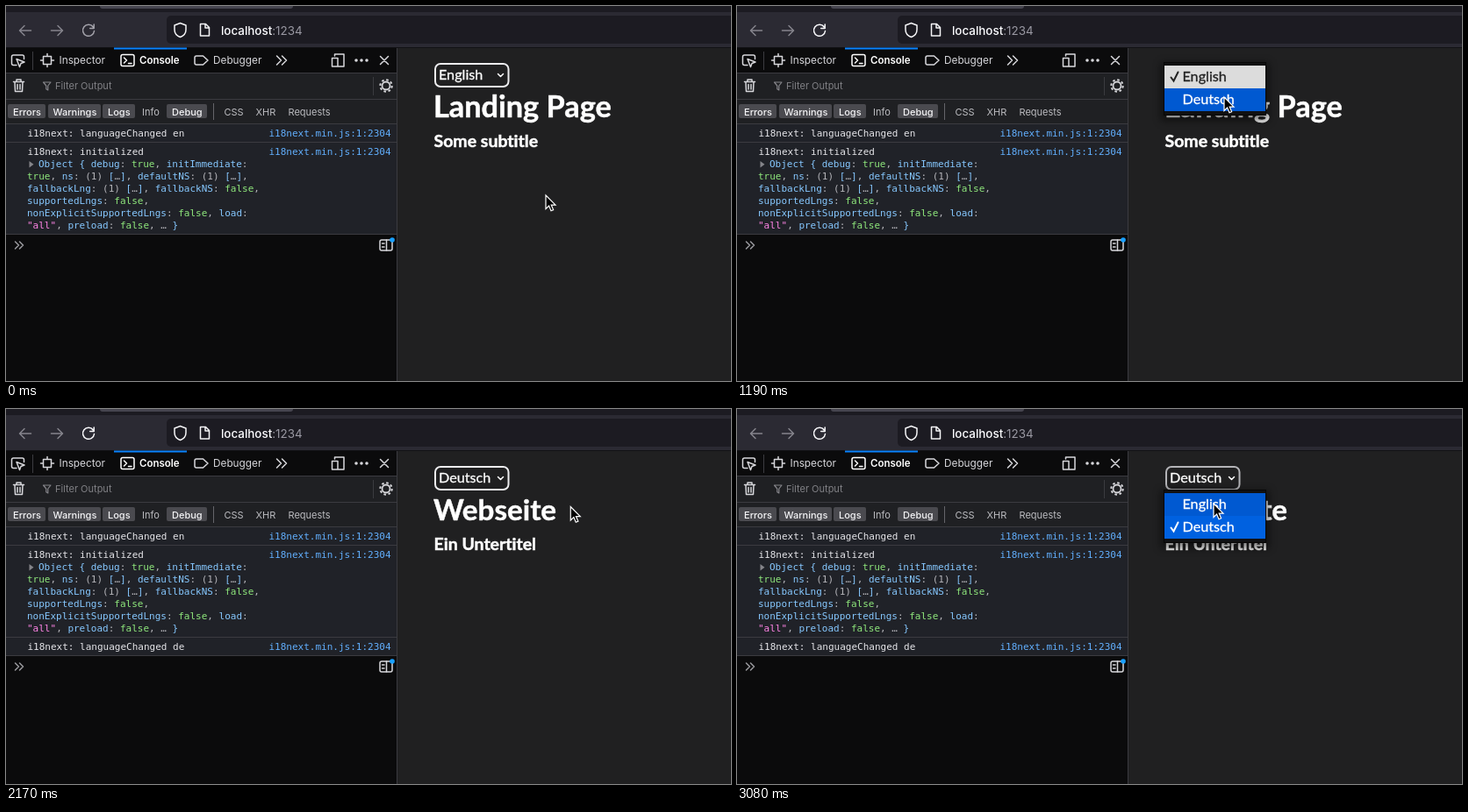
An HTML page for the animation above (3.15 s loop, 826 by 428 pixels).

```html
<!DOCTYPE html>
<html lang="en">
<head>
<meta charset="utf-8">
<title>Language switch</title>
<style>
  html, body { margin: 0; width: 100%; height: 100%; overflow: hidden; background: #202021; }
  svg { display: block; width: 826px; height: 428px; }
  text { white-space: pre; font-variant-ligatures: none; }
  .ui { font-family: Inter, Roboto, sans-serif; font-size: 11px; fill: #bcbcc0; }
  .tab { font-size: 11.8px; fill: #d7d7db; }
  .mono { font-family: "DejaVu Sans Mono", monospace; font-size: 11px; fill: #e6e6ea; }
  .page { font-family: Lato, "Open Sans", sans-serif; font-size: 16.2px; fill: #fff; stroke: #fff; stroke-width: .3; }
  .bold { font-weight: 700; stroke-width: .5; }
  .key { fill: #86c8ff; }
  .link { fill: #62b0ff; }
  .bool { fill: #8fe87c; }
  .str { fill: #ff84e6; }
  .dim { fill: #b4b4b9; }
  .line { fill: none; stroke: #d7d7db; stroke-width: 1.5; stroke-linecap: round; stroke-linejoin: round; }
  .rule { fill: none; stroke: #3b3b40; }
</style>
</head>
<body>
<svg viewBox="0 0 826 428">
  <defs>
    <filter id="blur" x="-30%" y="-30%" width="160%" height="160%"><feGaussianBlur stdDeviation="5"/></filter>
  </defs>

  <!-- browser bar -->
  <rect width="826" height="48" fill="#2b2a33"/>
  <rect width="826" height="7" fill="#1c1b22"/>
  <rect x="107" y="-4" width="220" height="7" rx="3" fill="#46454f"/>
  <rect x="183" y="11" width="660" height="32" rx="5" fill="#1c1b22"/>
  <g class="line">
    <path d="M28.5 28H16m5-5.5L15.5 28l5.5 5.5M51.5 28H64m-5-5.5l5.5 5.5-5.5 5.5" stroke="#85848c"/>
    <path id="reload" d="M99.3 24A6.5 6.5 0 1 0 100.5 28.5M100.2 21v4.5h-4.5"/>
    <path d="M198.500 19.500l6.500 2.500v5q0 6-6.500 8.500-6.500-2.500-6.500-8.500v-5zM221.500 20.500h6l4 4v9.500h-10zM227 21v4h4.500" stroke="#f4f4f6"/>
  </g>
  <text class="ui" x="245" y="32.5" style="font-size:13.4px"><tspan fill="#fbfbfe" font-weight="500">localhost</tspan><tspan fill="#9a99a3">:1234</tspan></text>

  <!-- developer tools -->
  <rect y="48" width="446" height="380" fill="#0b0b0c"/>
  <rect y="77" width="446" height="57" fill="#1f2023"/>
  <rect id="log" y="134" width="446" height="127" fill="#202228"/>
  <path d="M0 47.5H826" stroke="#111114"/>
  <path class="rule" d="M0 76.5H445M0 106.5H445M0 134.5H445M0 155.5H445M0 260.5H445M445.5 48V428M30.5 52V73M418.5 81V102"/>
  <path d="M236.5 111V130" stroke="#65656a"/>
  <path d="M123 48.5H206" stroke="#0a84ff" stroke-width="2"/>

  <g class="line">
    <path d="M12 67.5H8.5q-2 0-2-2V58q0-2 2-2h10q2 0 2 2v2.5M12 60.5l9 3.5-4 1.5-1.5 4z"/>
    <path d="M42.5 57.5h9v9h-9zM47 54.5v3m0 9v3M39.5 62h3m9 0h3"/>
    <rect x="131" y="55.5" width="15" height="13" rx="2" stroke="#fff"/>
    <path d="M134.5 59l3 3-3 3M139.5 65.5h3.5" stroke="#fff"/>
    <path d="M217 57h7.5l5.5 5-5.5 5H217q-2 0-2-2v-6q0-2 2-2z"/>
    <path d="M308.5 57l5 5-5 5m6-10l5 5-5 5"/>
    <path d="M374.5 57v-2h10.5v14h-6M371.5 59.5h6.5v9.5h-6.5zM426.5 57.5l9 9m0-9l-9 9"/>
    <path d="M8.5 86.5h12M12 86v-2h5v2M10 87l.5 10.5h8L19 87M13 89.5v5.5m3-5.5v5.5"/>
    <path d="M42.5 87h8.5l-3.2 4v5l-2-1.2V91z" stroke="#85858a" stroke-width="1.2"/>
    <circle cx="433" cy="91" r="4.5" stroke-width="1.8"/>
    <circle cx="433" cy="91" r="6.7" stroke-width="2" stroke-linecap="butt" stroke-dasharray="2.6 2.662"/>
  </g>
  <path d="M399 62h0m6 0h0m6 0h0" stroke="#d7d7db" stroke-width="3.6" stroke-linecap="round"/>

  <g class="ui tab">
    <text x="60.5" y="66.3">Inspector</text>
    <text x="152" y="66.3" font-weight="600" fill="#fff" style="font-size:11.5px">Console</text>
    <text x="236" y="66.3">Debugger</text>
  </g>
  <text class="ui" x="56" y="95" style="fill:#808085">Filter Output</text>
  <g id="filters" class="ui"></g>

  <g id="messages" class="mono"></g>
  <path d="M26.5 177l5 3.7-5 3.7z" fill="#85858a"/>
  <g id="changed">
    <path class="rule" d="M0 281.5H445"/>
  </g>

  <g id="prompt">
    <path class="line" d="M10.5 269l4 4-4 4m5-8l4 4-4 4" stroke-width="1.3" style="stroke:#9a9a9f"/>
    <rect class="line" x="426" y="267" width="14" height="12" rx="2"/>
    <path class="line" d="M433.5 267v12M428.5 271h2.500m-2.500 4h2.500"/>
    <circle cx="440" cy="267" r="2.8" fill="#18a0ff"/>
  </g>

  <!-- web page -->
  <rect x="446" y="48" width="380" height="380" fill="#202021"/>
  <text id="title" class="page bold" x="487" y="127"></text>
  <text id="subtitle" class="page bold" x="487.5" y="160.5" style="font-size:19.5px"></text>
  <rect id="select" x="489" y="66" width="83.5" height="26" rx="6" fill="#202021" stroke-width="2"/>
  <text id="value" class="page" x="493" y="84"></text>
  <path class="line" d="M560.5 77.5l3 3 3-3" style="stroke:#fff"/>

  <g id="popup">
    <rect x="483" y="1" width="123" height="66" fill="#000" opacity=".5" filter="url(#blur)"/>
    <rect x="486.5" y=".5" width="116" height="60" fill="#111112" stroke="#070707"/>
    <rect id="row0" x="487" y="4" width="115" height="26"/>
    <rect id="row1" x="487" y="30" width="115" height="26"/>
    <path id="check" d="M494.5 17.5l3 4 5-10" fill="none" stroke-width="2" stroke-linecap="round"/>
    <text id="item0" class="page" x="507.5" y="22.3">English</text>
    <text class="page" x="507.5" y="48.3">Deutsch</text>
  </g>

  <g id="cursor">
    <path id="arrow" d="M0 0V15.500l3.600-3.400 2.400 5.600 2.600-1.100-2.400-5.500h4.800z" fill="#000" stroke="#fff" stroke-width="1.2"/>
    <path id="beam" d="M-3-8q3 0 3 2.5q0-2.5 3-2.5M0-6V6M-3 8q3 0 3-2.5q0 2.5 3 2.5M-2 2h4" fill="none" stroke="#fff" stroke-width="1.8"/>
  </g>
</svg>

<script>
const $ = id => document.getElementById(id);
const show = (id, on) => $(id).setAttribute("visibility", on ? "visible" : "hidden");
const paint = (id, attrs) => { for (const k in attrs) $(id).setAttribute(k, attrs[k]); };

// [label, text x, pill x, pill width]
$("filters").innerHTML = [
  ["Errors", 8, 2, 43], ["Warnings", 53.5, 48, 60], ["Logs", 116, 110, 37], ["Info", 155],
  ["Debug", 189, 183, 46], ["CSS", 248.5], ["XHR", 284.5], ["Requests", 321.5]
].map(([label, x, px, w]) =>
  (w ? `<rect x="${px}" y="112" width="${w}" height="16" rx="2" fill="#4a4a4f"/>` : "") +
  `<text x="${x}" y="124.5" ${w ? 'font-weight="500" style="fill:#f4f4f6"' : ""}>${label}</text>`
).join("");

const message = (text, y) =>
  `<text x="24.5" y="${y}">i18next: ${text}</text>
   <text class="link" x="299.5" y="${y}">i18next.min.js:1:2304</text>`;

const kinds = [[/^(true|false)$/, "bool"], [/^"/, "str"], [/^(\(1\)|[:,…])$/, "dim"], [/./, "key"]];
const colour = line => line.replace(/"all"|\(1\)|\w+|[^\w\s]|\s+/g, part =>
  `<tspan class="${kinds.find(([re]) => re.test(part))[1]}">${part}</tspan>`);

$("messages").innerHTML = message("languageChanged en", 148.5) + message("initialized", 169.5) + [
  "Object { debug: true, initImmediate:",
  "true, ns: (1) […], defaultNS: (1) […],",
  "fallbackLng: (1) […], fallbackNS: false,",
  "supportedLngs: false,",
  "nonExplicitSupportedLngs: false, load:",
  '"all", preload: false, … }'
].map((s, i) => `<text x="${i ? 24 : 37}" y="${183.5 + 14 * i}">${colour(s)}</text>`).join("");
$("changed").innerHTML += `<g class="mono">${message("languageChanged de", 274.5)}</g>`;

const LOOP = 3150, STEP = 70;
const OPEN_EN = 630, HOVER_DE = 980, PICK_DE = 1470, OPEN_DE = 2520, HOVER_EN = 2870;

// [time, x, y] of the pointer
const path = [
  [0, 615, 216], [210, 594, 166], [420, 556, 95], [560, 551, 84], [770, 551, 84],
  [910, 552, 97], [1050, 555, 104], [1190, 555, 104], [1400, 560, 112], [1470, 578, 115],
  [1610, 715, 139], [1680, 747, 143], [1890, 747, 143], [2100, 680, 122], [2380, 533, 80],
  [2730, 533, 80], [2940, 540, 101], [3080, 543, 108], [LOOP, 543, 108]
];

function pointer(t) {
  const i = path.findIndex(p => p[0] > t);
  const [a, ax, ay] = path[i - 1], [b, bx, by] = path[i];
  const k = (t - a) / (b - a);
  return [ax + (bx - ax) * k, ay + (by - ay) * k];
}

function draw(t) {
  const german = t >= PICK_DE;
  const open = german ? t >= OPEN_DE : t >= OPEN_EN;
  const hover = german ? t < HOVER_EN : t >= HOVER_DE;
  const [x, y] = pointer(t);

  $("reload").style.stroke = t < STEP ? "#a5a4ac" : "#fbfbfe";
  $("title").textContent = german ? "Webseite" : "Landing Page";
  $("title").style.fontSize = german ? "33.2px" : "34.3px";
  $("subtitle").textContent = german ? "Ein Untertitel" : "Some subtitle";
  $("value").textContent = german ? "Deutsch" : "English";
  show("changed", german);
  paint("log", { height: german ? 148 : 127 });
  paint("prompt", { transform: `translate(0 ${german ? 21 : 0})` });

  const near = x < 580 && y < 100;
  paint("select", { stroke: near || open ? "#b4b4b8" : "#ececee" });

  const pale = !german && hover;
  const ink = pale ? "#222" : "#fff";
  show("popup", open);
  paint("popup", { transform: `translate(0 ${german ? 92 : 64})` });
  paint("row0", { fill: pale ? "#dcdcdc" : german && hover ? "none" : "#0059d1" });
  paint("row1", { fill: german && !hover ? "#0061e0" : hover ? "#0059d1" : "none" });
  paint("check", { stroke: ink, transform: `translate(0 ${german ? 26 : 0})` });
  $("item0").style.fill = $("item0").style.stroke = ink;

  const overTitle = !open && y > 92 && y < 132 && x < (german ? 628 : 691);
  paint("cursor", { transform: `translate(${x} ${y})` });
  show("arrow", !overTitle);
  show("beam", overTitle);
}

function tick() {
  const t = performance.now() % LOOP;
  draw(Math.floor(t / STEP) * STEP);
  requestAnimationFrame(tick);
}
tick();
</script>
</body>
</html>
```
